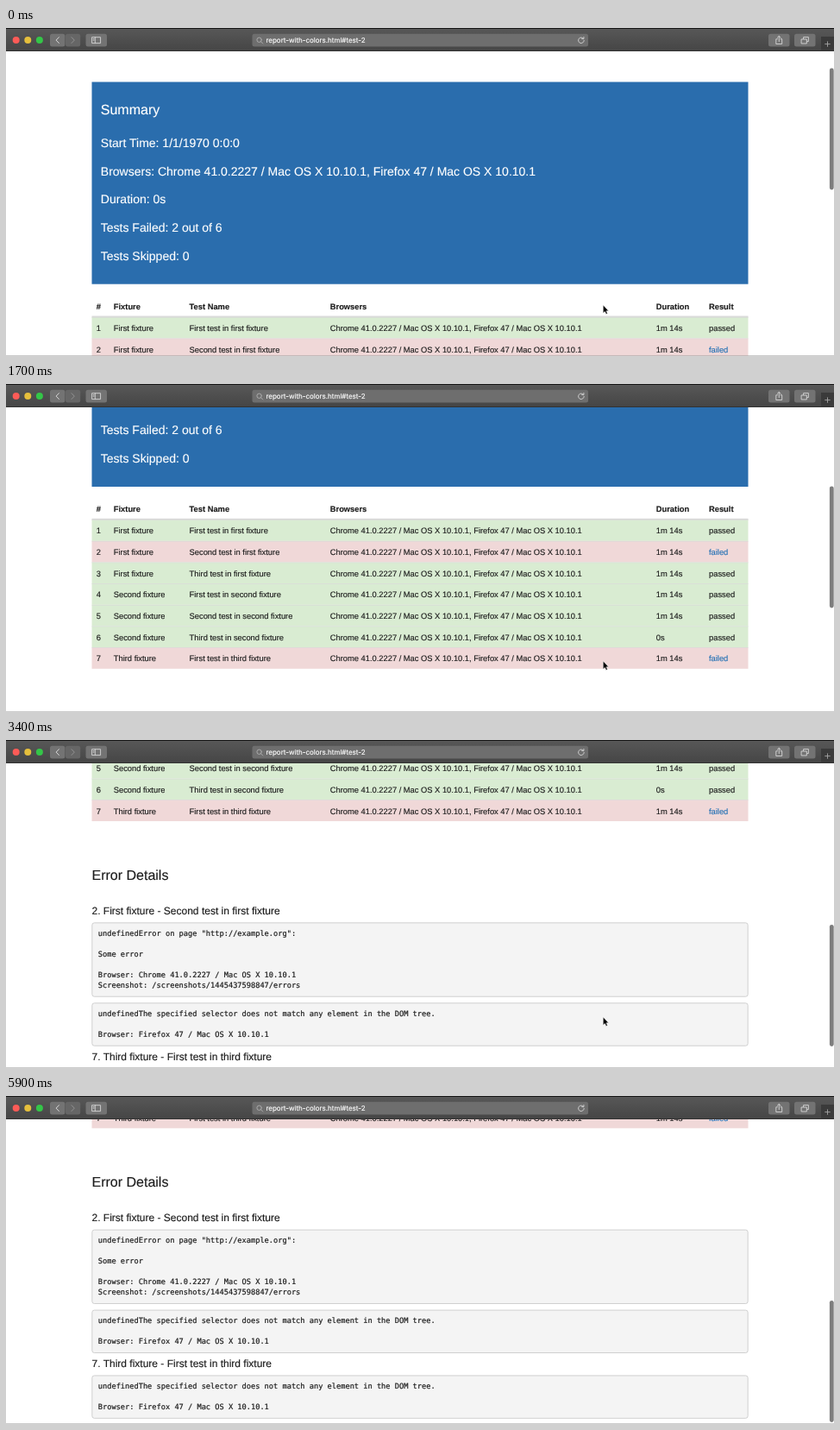
An HTML page for the animation above (6000 ms loop, 960 px wide and 380 px high).

```html
<!DOCTYPE html>
<html lang="en">
<head>
<meta charset="utf-8">
<title>Test report</title>
<style>
  html, body { margin: 0; width: 100%; height: 100%; overflow: hidden; background: #fff; }
  svg { display: block; width: 960px; height: 380px; }
  text {
    white-space: pre; font-family: "Liberation Sans", Arial, sans-serif;
    fill: #1c1c1c; stroke: #1c1c1c; stroke-width: .15; text-rendering: geometricPrecision;
  }
  .h1 { font-size: 16px; }
  .h2 { font-size: 12px; }
  .info { font-size: 14px; }
  .title { font-size: 16px; }
  .info, .title { fill: #fff; stroke: #fff; }
  .cell { font-size: 9.333px; }
  .head { font-size: 9.333px; font-weight: 700; }
  .link { font-size: 9.333px; fill: #2270b4; stroke: #2270b4; }
  .code { font-family: "DejaVu Sans Mono", monospace; font-size: 8.667px; stroke-width: .2; }
  .url { font-family: Inter, Roboto, sans-serif; font-size: 8px; fill: #fff; stroke: #fff; }
  .icon { fill: none; stroke: #d6d6d6; stroke-width: 1; stroke-linecap: round; stroke-linejoin: round; }
</style>
</head>
<body>
<svg viewBox="0 0 960 380">
  <defs>
    <linearGradient id="bar" x1="0" y1="0" x2="0" y2="1">
      <stop offset="0" stop-color="#585858"/>
      <stop offset="1" stop-color="#454545"/>
    </linearGradient>
  </defs>
  <g id="page"></g>
  <rect id="thumb" x="954.9" width="4.8" height="141" rx="2.4" fill="#7d7d7d"/>
  <g id="chrome"></g>
  <path id="cursor" d="M692.3 320.9v9.4l2.1-1.9 1.4 3.1 1.6-.7-1.4-3h2.7z" fill="#000" stroke="#fff" stroke-width=".5"/>
  <path d="M0 379.7H960" stroke="#999" stroke-width=".6"/>
</svg>
<script>
const page = document.getElementById('page');
const chrome = document.getElementById('chrome');
const thumb = document.getElementById('thumb');
const cursor = document.getElementById('cursor');

function add(parent, tag, attrs, label) {
  const el = document.createElementNS('http://www.w3.org/2000/svg', tag);
  for (const key in attrs) el.setAttribute(key, attrs[key]);
  if (label) el.textContent = label;
  parent.append(el);
  return el;
}
const rect = (parent, x, y, width, height, fill, rx = 0) =>
  add(parent, 'rect', { x, y, width, height, fill, rx });
const text = (parent, x, y, cls, label) => add(parent, 'text', { x, y, class: cls }, label);
const icon = (d, style = '') => add(chrome, 'path', { d, class: 'icon', style });

const LEFT = 99.5, WIDTH = 761;
const AGENTS = 'Chrome 41.0.2227 / Mac OS X 10.10.1, Firefox 47 / Mac OS X 10.10.1';

function drawSummary() {
  rect(page, LEFT, 62.5, WIDTH, 234.2, '#2a6dad');
  text(page, 109.8, 99.8, 'title', 'Summary');
  ['Start Time: 1/1/1970 0:0:0', 'Browsers: ' + AGENTS, 'Duration: 0s',
    'Tests Failed: 2 out of 6', 'Tests Skipped: 0']
    .forEach((line, i) => text(page, 109.8, 137.8 + i * 32.75, 'info', line));
}

function drawTable() {
  const cols = [104.8, 124.8, 212.6, 375.8, 753.8, 815];
  const row = (y, cells, cls) => cells.forEach((cell, i) =>
    text(page, cols[i], y, cell === 'failed' ? 'link' : cls, cell));
  row(325.5, ['#', 'Fixture', 'Test Name', 'Browsers', 'Duration', 'Result'], 'head');

  const tests = ['First First', 'First Second', 'First Third', 'Second First',
    'Second Second', 'Second Third', 'Third First'];
  const top = 334.9, step = 24.667;
  tests.forEach((pair, i) => {
    const [fixture, name] = pair.split(' ');
    const failed = i === 1 || i === 6;
    const y = top + i * step;
    rect(page, LEFT, y, WIDTH, step, failed ? '#f0d8d8' : '#d9ecd2');
    rect(page, LEFT, y, WIDTH, .667, '#d8d8d8');
    row(y + 16.1, [String(i + 1), fixture + ' fixture',
      `${name} test in ${fixture.toLowerCase()} fixture`, AGENTS,
      i === 5 ? '0s' : '1m 14s', failed ? 'failed' : 'passed'], 'cell');
  });
  rect(page, LEFT, top - 1.33, WIDTH, 1.33, '#d8d8d8');
}

function drawErrors() {
  const block = (y, height, lines) => {
    const box = rect(page, LEFT + .33, y + .33, WIDTH - .67, height, '#f4f4f4', 2.6);
    box.setAttribute('stroke', '#c6c6c6');
    box.setAttribute('stroke-width', .8);
    lines.forEach((line, i) => text(page, 106.8, y + 15.6 + i * 12, 'code', line));
  };
  const missing = ['undefinedThe specified selector does not match any element in the DOM tree.',
    '', 'Browser: Firefox 47 / Mac OS X 10.10.1'];

  text(page, LEFT, 575.4, 'h1', 'Error Details');
  text(page, LEFT, 615.4, 'h2', '2. First fixture - Second test in first fixture');
  block(625, 85.4, ['undefinedError on page "http://example.org":', '', 'Some error', '',
    'Browser: Chrome 41.0.2227 / Mac OS X 10.10.1',
    'Screenshot: /screenshots/1445437598847/errors']);
  block(718, 49.4, missing);
  text(page, LEFT, 784.4, 'h2', '7. Third fixture - First test in third fixture');
  block(793.8, 49.4, missing);
}

function drawToolbar() {
  rect(chrome, 0, 0, 960, 27, 'url(#bar)');
  rect(chrome, 0, 0, 960, 1, '#161616');
  rect(chrome, 0, 26.3, 960, .7, '#2a2a2a');
  ['#fc5b57', '#e5bf3c', '#34c648'].forEach((fill, i) =>
    add(chrome, 'circle', { cx: 11.7 + i * 13.6, cy: 14.1, r: 4, fill }));

  const button = (x, w, fill = '#737373') => rect(chrome, x, 6.8, w, 14.6, fill, 2.5);
  button(51, 17.4);
  button(69, 17.2, '#666');
  button(92.5, 24.5);
  button(285.5, 389.5, '#6e6e6e');
  button(884, 24.5);
  button(914, 24.5);
  rect(chrome, 945, 10, 15, 16.5, '#3a3a3a');

  icon('M61.4 10.7l-3.3 3.4 3.3 3.4');
  icon('M76 10.7l3.3 3.4-3.3 3.4', 'stroke:#929292');
  icon('M100 10.7h9.6v6.9H100zM103.3 10.7v6.9M101.2 12.6h.8M101.2 14.2h.8', 'stroke-width:.9');
  icon('M295.6 15.8l2.2 2.2M296.3 13.8a2.7 2.7 0 1 1-5.4 0a2.7 2.7 0 1 1 5.4 0', 'stroke:#b8b8b8;stroke-width:.8');
  text(chrome, 301.4, 17.1, 'url', 'report-with-colors.html#test-2');
  icon('M669.6 12.4a3.3 3.3 0 1 0 .6 2M669.9 10.4v2.2h-2.2', 'stroke-width:.9');
  icon('M894.4 12.8h-1.6v5.7h6.9v-5.7h-1.6M896.25 15.6v-6M894.3 11.2l1.95-1.9 1.95 1.9', 'stroke-width:.9');
  icon('M922.5 13h5.8v5h-5.8zM924.6 12.6v-2h5.8v5h-1.8', 'stroke-width:.9');
  icon('M949.7 18.6h5.6M952.5 15.8v5.6', 'stroke:#a5a5a5;stroke-width:.9');
}

// Scroll position over time: [ms, px]
const LOOP = 6000, TICK = 100, CURSOR_HIDES = 4900;
const stops = [[0, 0], [800, 81], [1700, 177.7], [2400, 298], [3400, 413.5],
  [4200, 471], [4800, 471], [4900, 470.2]];
const slope = i => {
  const a = stops[i - 1], b = stops[i], c = stops[i + 1];
  if (!a || !c || (b[1] - a[1]) * (c[1] - b[1]) <= 0) return 0;
  return (c[1] - a[1]) / (c[0] - a[0]);
};

function scrollAt(t) {
  const i = stops.findIndex((s, k) => k + 1 < stops.length && t < stops[k + 1][0]);
  if (i < 0) return stops[stops.length - 1][1];
  const [t0, y0] = stops[i], [t1, y1] = stops[i + 1];
  const span = t1 - t0, u = (t - t0) / span, v = 1 - u;
  return y0 * v * v * (1 + 2 * u) + y1 * u * u * (3 - 2 * u)
    + span * u * v * (slope(i) * v - slope(i + 1) * u);
}

function render(now) {
  const t = Math.floor((now % LOOP) / TICK) * TICK;
  const y = scrollAt(t);
  page.setAttribute('transform', `translate(0 ${-y})`);
  thumb.setAttribute('y', 46.5 + y * .405);
  cursor.setAttribute('visibility', t < CURSOR_HIDES ? 'visible' : 'hidden');
}

drawSummary();
drawTable();
drawErrors();
drawToolbar();

const start = performance.now();
(function frame() {
  render(performance.now() - start);
  requestAnimationFrame(frame);
})();
</script>
</body>
</html>
```
